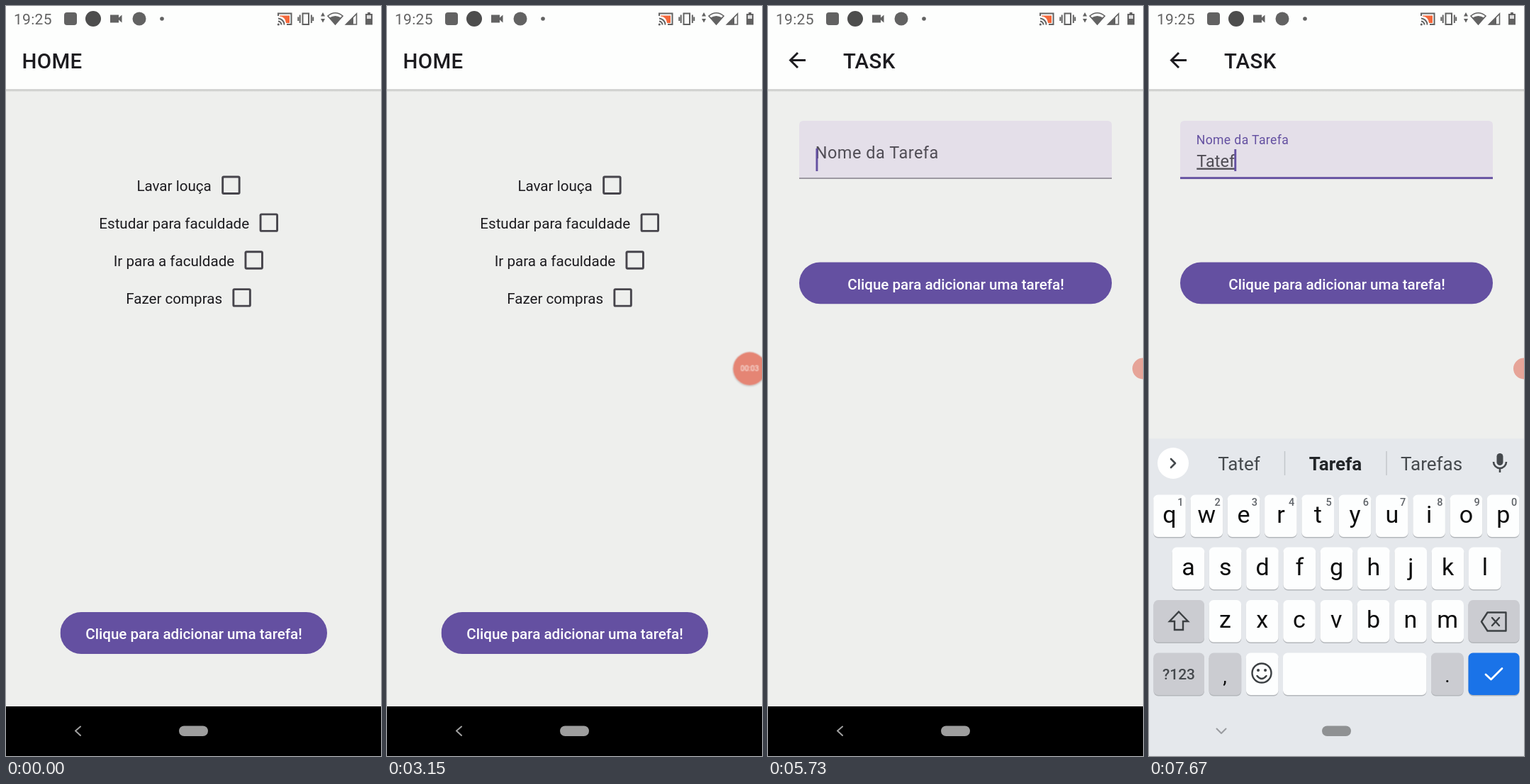
Recreate the animation shown at these times as an HTML page. Size 529 by 1058 pixels, loop 8000 ms.

```html
<!DOCTYPE html>
<html lang="pt-BR">
<head>
<meta charset="utf-8">
<title>Lista de tarefas</title>
<style>
html, body { margin: 0; width: 100%; height: 100%; overflow: hidden; background: #eeefed; }
#stage { display: block; width: 529px; height: 1058px; font-family: Roboto, sans-serif; }
text { white-space: pre; }
.mid { text-anchor: middle; }
.title { font-size: 29.4px; font-weight: 500; letter-spacing: .4px; fill: #1c1b1f; }
.item { font-size: 20.6px; fill: #1c1b1f; }
.btn { font-size: 20.57px; font-weight: 500; fill: #fff; }
.input { font-size: 23.5px; fill: #504d55; }
.key { font-size: 34px; fill: #0d0d0d; }
.hint { font-size: 14.5px; font-weight: 500; fill: #5f6368; }
.sugg { font-size: 26px; fill: #45494d; }
.line { fill: none; stroke-linecap: round; stroke-linejoin: round; }

.anim, .step { animation: 8s linear infinite; }
.step { animation-timing-function: step-end; }
.box, .hole { transform-box: fill-box; transform-origin: center; }

#row0 { animation-name: press0; }
#row1 { animation-name: press1; }
#row0 .box { animation-name: dip0; }
#row1 .box { animation-name: dip1; }
#row0 .hole { animation-name: clear0; }
#row1 .hole { animation-name: clear1; }
#row0 .mark { animation-name: mark0; }
#row1 .mark { animation-name: mark1; }
#row0, #row1 { animation-timing-function: cubic-bezier(.455, .03, .515, .955); }
.hole { animation-timing-function: ease-in-out; }
.mark { opacity: 0; }

@keyframes press0 {
  0%, 2.5%, 7.5%, 31.375%, 36.375%, 100% { opacity: 1; }
  4.375%, 33.25% { opacity: .2; }
}
@keyframes press1 {
  0%, 16.625%, 21.25%, 26.625%, 31.625%, 100% { opacity: 1; }
  18.5%, 28.5% { opacity: .2; }
}
@keyframes mark0 { 0%, 33.25%, 100% { opacity: 0; } 4.375% { opacity: 1; } }
@keyframes mark1 { 0%, 28.5%, 100% { opacity: 0; } 18.5% { opacity: 1; } }
@keyframes dip0 { 0%, 4.375%, 6.875%, 100% { transform: none; } 5.625% { transform: scale(.85); } }
@keyframes dip1 { 0%, 18.5%, 21%, 100% { transform: none; } 19.75% { transform: scale(.85); } }
@keyframes clear0 { 0%, 33.24%, 36.3%, 100% { transform: scale(1); } 33.25% { transform: scale(0); } }
@keyframes clear1 { 0%, 28.49%, 32%, 100% { transform: scale(1); } 28.5% { transform: scale(0); } }

#bubble { transform-origin: 509.5px 511.5px; animation-name: bubble; }
#count { animation-name: count; }
#dock { opacity: 0; animation-name: dock; }
@keyframes bubble {
  0%, .37% { opacity: 0; transform: translateX(50px); }
  .375% { opacity: 1; transform: translateX(50px); animation-timing-function: ease-out; }
  3.125%, 33.75% { opacity: 1; transform: none; }
  35.625%, 51.12% { opacity: .95; transform: translateX(2px) scale(.97); }
  51.125%, 100% { opacity: 0; }
}
@keyframes count {
  0% { transform: none; }
  13.25% { transform: translateY(-40px); }
  25.75% { transform: translateY(-80px); }
  38.25%, 100% { transform: translateY(-120px); }
}
@keyframes dock { 0% { opacity: 0; } 51.125%, 100% { opacity: 1; } }

#ripple { opacity: 0; transform-origin: 265px 885px; animation-name: ripple; }
@keyframes ripple {
  0%, 56.5% { opacity: 0; transform: scale(.2); }
  57% { opacity: .12; }
  59.2%, 60.5% { opacity: .12; transform: none; }
  63%, 100% { opacity: 0; transform: none; }
}

#task { opacity: 0; animation-name: fadeIn, rise; }
@keyframes fadeIn {
  0%, 59.75% { opacity: 0; animation-timing-function: cubic-bezier(.17, .84, .44, 1); }
  62.25%, 100% { opacity: 1; }
}
@keyframes rise {
  0%, 59.75% { transform: translateY(75px); animation-timing-function: cubic-bezier(.23, 1, .32, 1); }
  63.625%, 100% { transform: none; }
}

#focus { opacity: 0; animation-name: focus; }
#label { fill: #504d55; letter-spacing: .5px; transform-origin: 66.7px 215px; animation-name: label; }
#hintText { opacity: 0; animation-name: hintText; }
#caret { opacity: 0; animation-name: caret; }
.reel { animation-name: reel; }
@keyframes focus { 0% { opacity: 0; } 72.75%, 100% { opacity: 1; } }
@keyframes label {
  0%, 72.75% { transform: none; fill: #504d55; animation-timing-function: ease-in-out; }
  74.625%, 100% { transform: translateY(-20px) scale(.75); fill: #6450a1; }
}
@keyframes hintText { 0%, 73.5% { opacity: 0; } 74.625%, 100% { opacity: 1; } }
@keyframes caret { 0%, 81%, 100% { opacity: 0; } 71.625% { opacity: 1; } }
@keyframes reel {
  0% { transform: none; }
  85.625% { transform: translateY(-100px); }
  89.375% { transform: translateY(-200px); }
  91.625% { transform: translateY(-300px); }
  93.5% { transform: translateY(-400px); }
  95.5%, 100% { transform: translateY(-500px); }
}

#keyboard { opacity: 0; animation-name: slideUp; }
#keyNav { opacity: 0; animation-name: keyNav; }
#caps { animation-name: caps; }
#lower { opacity: 0; animation-name: lower; }
.pop { opacity: 0; animation-name: pop; }
@keyframes slideUp {
  0%, 74.125% { opacity: 0; transform: translateY(150px); animation-timing-function: cubic-bezier(.1, .7, .3, 1); }
  75.5% { opacity: 1; }
  77.5%, 100% { opacity: 1; transform: none; }
}
@keyframes keyNav { 0%, 74.125% { opacity: 0; } 75.5%, 100% { opacity: 1; } }
@keyframes caps { 0% { opacity: 1; } 85.625%, 100% { opacity: 0; } }
@keyframes lower { 0% { opacity: 0; } 85.625%, 100% { opacity: 1; } }
@keyframes pop { 0% { opacity: 1; } 1.125%, 100% { opacity: 0; } }
</style>
</head>
<body>
<svg id="stage" viewBox="0 0 529 1058" width="529" height="1058">
  <defs>
    <linearGradient id="shade" x2="0" y2="1">
      <stop stop-color="#000" stop-opacity=".2"/><stop offset="1" stop-color="#000" stop-opacity="0"/>
    </linearGradient>
    <clipPath id="pill"><rect x="76.5" y="855" width="376.5" height="59" rx="29.5"/></clipPath>
    <filter id="soft" x="-30%" y="-30%" width="160%" height="160%">
      <feDropShadow dx="0" dy="1" stdDeviation="1.5" flood-opacity=".25"/>
    </filter>
  </defs>

  <g id="home">
    <rect width="529" height="1058" fill="#eeefed"/>
    <rect width="529" height="117.5" fill="#fdfefd"/>
    <rect y="117.5" width="529" height="4" fill="url(#shade)"/>
    <text class="title" x="22.5" y="87.5">HOME</text>
    <g id="rows"></g>
    <g clip-path="url(#pill)">
      <rect x="76" y="854" width="378" height="61" fill="#6450a1"/>
      <circle id="ripple" class="anim" cx="265" cy="885" r="195" fill="#fff"/>
    </g>
    <text class="btn mid" x="265" y="893">Clique para adicionar uma tarefa!</text>
  </g>

  <g id="task" class="anim">
    <rect y="36" width="529" height="1022" fill="#eeefed"/>
    <rect y="36" width="529" height="81.5" fill="#fdfefd"/>
    <rect y="117.5" width="529" height="4" fill="url(#shade)"/>
    <path d="M53 76.5H32M42 66L31.5 76.5L42 87" fill="none" stroke="#1c1b1f" stroke-width="2.9"/>
    <text class="title" x="106" y="87.5">TASK</text>
    <path d="M44 244V168q0-6 6-6H479q6 0 6 6V244Z" fill="#e4dfe9"/>
    <rect x="44" y="242.3" width="441" height="1.5" fill="#85828b"/>
    <rect id="focus" class="step" x="44" y="241.2" width="441" height="2.9" fill="#6450a1"/>
    <text id="label" class="input anim" x="66.7" y="215">Nome da Tarefa</text>
    <svg x="60" y="198" width="420" height="40"><g id="typed" class="reel step">
      <text id="hintText" class="input anim" x="6.3" y="28.5">Digite o nome da tarefa desejada!</text>
    </g></svg>
    <rect id="caret" class="step" x="67.5" y="201" width="2.9" height="32" fill="#6450a1"/>
    <rect x="44" y="361.5" width="441" height="58.7" rx="29.3" fill="#6450a1"/>
    <text class="btn mid" x="265" y="399.5">Clique para adicionar uma tarefa!</text>
  </g>

  <g id="status" fill="#626262" stroke="#626262" stroke-width="0">
    <text x="11" y="25.7" font-size="21" letter-spacing=".3">19:25</text>
    <rect x="82" y="9" width="18" height="18" rx="4"/>
    <circle cx="123" cy="18" r="11" fill="#4d4d4d"/>
    <path d="M147 12.5h12v4l4.500-4v11l-4.500-4v4h-12Z"/>
    <circle cx="188" cy="18" r="9.500"/>
    <circle cx="220" cy="18" r="2.800"/>
    <path d="M386 13.500H400V24H395Q394 15 386 14.500Z" fill="#f4673a"/>
    <g fill="none" stroke-width="2">
      <path d="M384 14V10.500H402.500V26H396M384 17.500a9 9 0 0 1 8.500 9M384 21.500a5 5 0 0 1 4.500 5"/>
      <path d="M418.500 10.500h8.500v15.500h-8.500ZM414.700 12.500v11.500M430.800 12.500v11.500M412.300 15.500v5.500M433.200 15.500v5.500"/>
      <path d="M454 14Q464.500 5.500 475 14L464.500 26Z" stroke-width="1.600"/>
      <path d="M479.500 26L494.500 11V26Z" stroke-width="1.600"/>
    </g>
    <circle cx="384.300" cy="26" r="1.600"/>
    <path d="M447 9l3 5.500h-6ZM447 23.500l3-5.500h-6ZM456.500 16.500Q464.500 11.500 472.500 16.500L464.500 26ZM479 26.500L490 15.500V26.500Z"/>
    <path d="M510 9h4v2h3v15.500h-10V11h3Z"/>
    <rect x="509" y="13" width="6" height="5" fill="#ddd"/>
  </g>

  <g id="nav">
    <rect y="988" width="529" height="70"/>
    <path class="line" d="M105 1016.500L98 1022.500L105 1029" stroke="#a0a0a0" stroke-width="2"/>
    <rect x="244" y="1015.500" width="41" height="14.500" rx="7.200" fill="#9d9d9d"/>
  </g>

  <g id="keyboard" class="anim">
    <rect y="611" width="529" height="600" fill="#e5e8ec"/>
    <rect y="609.500" width="529" height="1.500" fill="#e9ebec"/>
    <svg y="611" width="529" height="76"><g id="strip" class="reel step">
      <g fill="none" stroke="#5f6368" stroke-width="2.600">
        <circle cx="34" cy="34" r="22" fill="#fff" stroke="none"/>
        <path class="line" d="M37 28L31 34L37 40"/>
        <path d="M100 23H116q3 0 3 3V38L112 45H100q-3 0-3-3V26q0-3 3-3ZM119 37H112V45M102 35q5 7 10 0"/>
        <path d="M103 30h2M111 30h2" stroke-width="3"/>
        <circle cx="255" cy="34" r="7"/>
        <circle cx="255" cy="34" r="10.500" stroke-width="4" stroke-dasharray="4.200 4.050"/>
        <path d="M374.500 18V50" stroke="#c3c6ca" stroke-width="1.500"/>
      </g>
      <rect x="316" y="22" width="24" height="24" rx="3" fill="#6b6f74"/>
      <text class="mid" x="181" y="41.500" font-size="20" font-weight="700" letter-spacing="1" fill="#5f6368">GIF</text>
      <g fill="#4a4e52"><circle cx="412.500" cy="34" r="2.700"/><circle cx="420.500" cy="34" r="2.700"/><circle cx="428.500" cy="34" r="2.700"/></g>
    </g></svg>
    <rect x="490.500" y="631" width="9" height="17" rx="4.500" fill="#45494d"/>
    <path d="M486 643a9 9 0 0 0 18 0M495 652v6" fill="none" stroke="#45494d" stroke-width="2.600"/>
    <g id="keys"></g>
    <g id="caps" class="step"><path d="M42 853L57 869H49V881H35V869H27Z" fill="#2f3235"/></g>
    <g id="lower" class="step"><path d="M42 854.500L55 868H48V880H36V868H29Z" fill="none" stroke="#3c4043" stroke-width="2.400"/></g>
    <g class="line" stroke="#3c4043" stroke-width="2.400">
      <path d="M469 868.500L477.500 855.500H503.500V881.500H477.500ZM484 863L494 874M494 863L484 874"/>
      <circle cx="159" cy="941" r="13.500"/>
      <path d="M152.500 945q6.500 8 13 0"/>
      <path d="M154 937h.1M164 937h.1" stroke-width="4"/>
      <path d="M475 943L482.500 950L498 934.500" stroke="#fff" stroke-width="2.800"/>
    </g>
    <text class="mid" x="42" y="950" font-size="21" font-weight="500" fill="#45494d">?123</text>
    <text class="key mid" x="107" y="955" style="font-size:28px">,</text>
    <text class="key mid" x="421" y="954" style="font-size:28px">.</text>
    <g id="pops"></g>
  </g>
  <g id="keyNav" class="anim">
    <rect y="988" width="529" height="70" fill="#e5e8ec"/>
    <path class="line" d="M95.500 1019.500L102 1026L108.500 1019.500" stroke="#9a9ca0" stroke-width="2"/>
    <rect x="244" y="1015.500" width="41" height="14.500" rx="7.200" fill="#8f9193"/>
  </g>

  <g id="bubble" class="anim">
    <circle cx="509.500" cy="511.500" r="24" fill="#e47f6e" filter="url(#soft)"/>
    <svg x="485" y="500" width="49" height="24"><g id="count" class="step"></g></svg>
  </g>
  <circle id="dock" class="step" cx="529" cy="511.500" r="15" fill="#e6a498"/>
</svg>
<script>
const add = (id, markup) =>
  document.getElementById(id).insertAdjacentHTML('beforeend', markup);
const label = (cls, x, y, s, extra = '') =>
  `<text class="${cls}" x="${x}" y="${y}" ${extra}>${s}</text>`;

// To-do rows: text, text x, checkbox centre x
[['Lavar louça', 184.4, 317.4], ['Estudar para faculdade', 131.3, 370.8],
 ['Ir para a faculdade', 151.7, 349.7], ['Fazer compras', 169.2, 332.6]]
.forEach(([name, x, cx], i) => {
  const cy = 252.8 + i * 52.85;
  const square = (cls, size, rx, fill) =>
    `<rect class="${cls}" x="${cx - size / 2}" y="${cy - size / 2}" width="${size}" height="${size}" rx="${rx}" fill="${fill}"/>`;
  add('rows', `<g id="row${i}" class="anim">${label('item', x, cy + 8.4, name)}
    <g class="box anim">${square('', 26.4, 2.9, '#47454c')}${square('hole anim', 20.6, .5, '#eeefed')}
      <g class="mark step">${square('', 26.4, 2.9, '#6450a1')}
        <path d="M${cx - 9} ${cy + 1}l6.300 6.300l12.200-12.200" fill="none" stroke="#eeefed" stroke-width="2.900"/>
      </g></g></g>`);
});

for (let s = 0; s < 4; s++)
  add('count', label('mid', 24.5, 15.4 + s * 40, '00:0' + s, 'font-size="10.8" fill="#fff"'));

// Keyboard
const PITCH = 52.3;
const WHITE = '#fdfefe', GREY = '#cbccd1';
const cap = (x, y, w, fill) => add('keys',
  `<rect x="${x}" y="${y + 1.5}" width="${w}" height="59.500" rx="6.500" fill="#b4b7bb"/>
   <rect x="${x}" y="${y}" width="${w}" height="59.500" rx="6.500" fill="${fill}"/>`);
const spots = {};
[['qwertyuiop', 6.2, 689.5], ['asdfghjkl', 32.6, 763.5], ['zxcvbnm', 84.6, 838]]
.forEach(([letters, x0, y], row) => [...letters].forEach((ch, i) => {
  const x = x0 + i * PITCH, cx = x + 22.8;
  spots[ch] = { cx, y };
  cap(x, y, 45.6, WHITE);
  add('caps', label('key mid', cx, y + 42.4, ch.toUpperCase()));
  add('lower', label('key mid', cx, y + 39.3, ch));
  if (!row) add('keys', label('hint mid', cx + 15.3, y + 15.5, (i + 1) % 10));
}));
cap(6.500, 838, 71.5, GREY);
cap(450.500, 838, 72, GREY);
[[6.5, 71.5, GREY], [84.6, 45.6, GREY], [136.9, 45.6, WHITE], [189, 202.5, WHITE],
 [398, 45.6, GREY], [450.5, 72, '#1a73e8']].forEach(([x, w, fill]) => cap(x, 912.5, w, fill));

// Key previews: letter, press time in ms
[['T', 6820], ['a', 7090], ['t', 7270], ['e', 7420], ['f', 7580]].forEach(([ch, at]) => {
  const { cx, y } = spots[ch.toLowerCase()];
  add('pops', `<g class="pop step" style="animation-delay:${at}ms">
    <rect x="${cx - 28.4}" y="${y - 104.5}" width="56.800" height="165" rx="5" fill="${GREY}" filter="url(#soft)"/>
    ${label('key mid', cx - .8, y - 48.5, ch, 'style="font-size:41px"')}
    <path d="M${cx + 9.5} ${y - 32}h2.500m2.500 0h2.500m2.500 0h2.500" stroke="#222" stroke-width="2.500"/></g>`);
});

// Typed text and its suggestions, one reel step per letter
[['T', 'Tudo', 'Também'], ['Ta', 'Tarefa', 'Também'], ['Tat', 'Tarefa', 'Tarefas'],
 ['Tate', 'Tarefa', 'Tarefas'], ['Tatef', 'Tarefa', 'Tarefas']].forEach(([word, best, other], i) => {
  const y = 100 * (i + 1);
  add('typed', label('input', 7.3, y + 28.5, word, 'text-decoration="underline"'));
  const end = 7.3 + document.getElementById('typed').lastElementChild.getComputedTextLength();
  add('typed', `<rect x="${end - .8}" y="${y + 4}" width="2.900" height="31" fill="#6450a1"/>`);
  add('strip', `<circle cx="34" cy="${y + 34}" r="22" fill="#fff"/>
    <path class="line" d="M31 ${y + 28}l6 6l-6 6" stroke="#45494d" stroke-width="2.600"/>
    <path d="M191.500 ${y + 17}v34M335 ${y + 17}v34" stroke="#c3c6ca" stroke-width="1.500"/>
    ${label('sugg mid', 127, y + 44, word)}
    ${label('sugg mid', 263, y + 44, best, 'font-weight="700" style="fill:#222528"')}
    ${label('sugg mid', 398.5, y + 44, other)}`);
});
</script>
</body>
</html>
```
